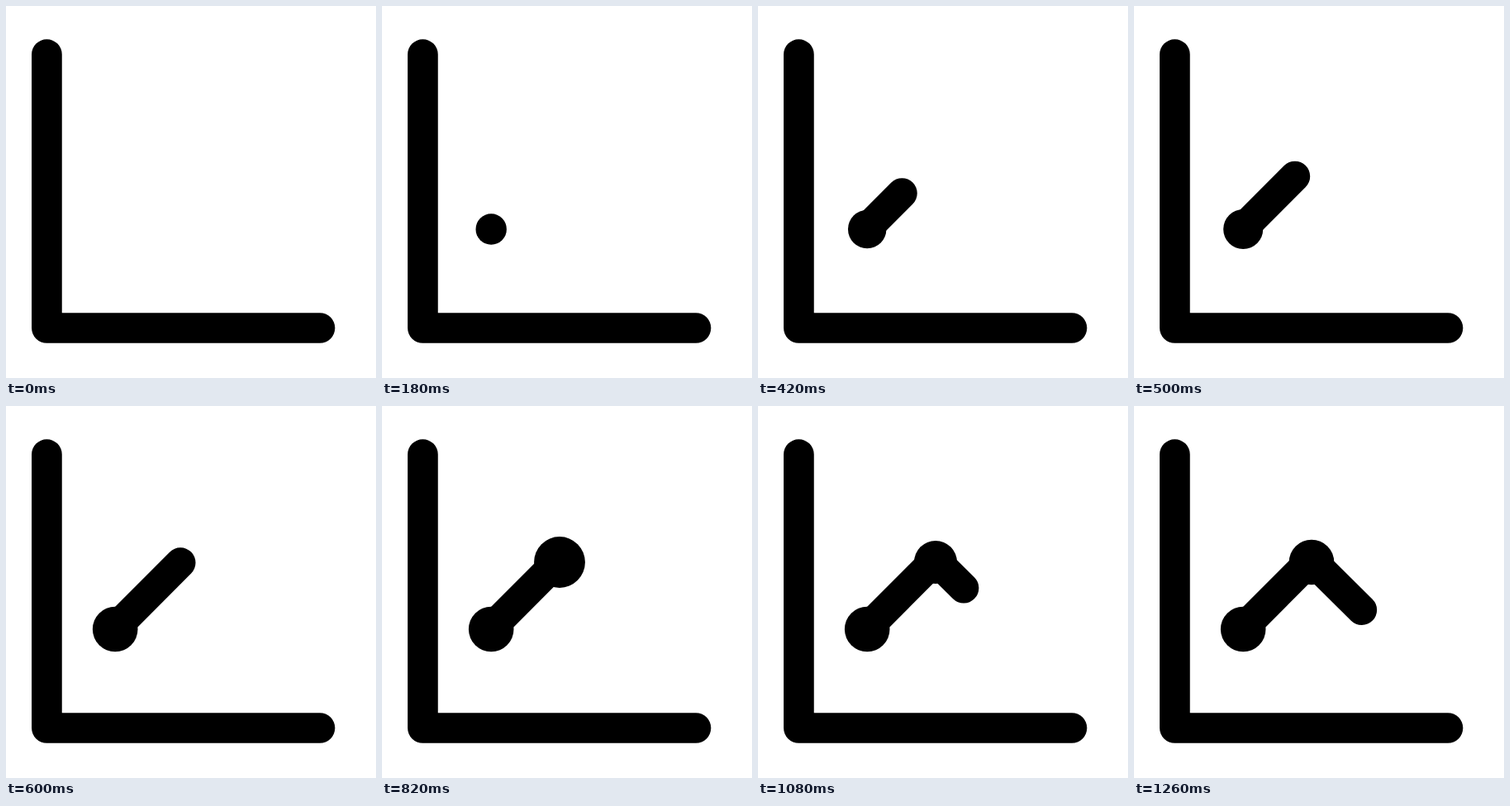
Recreate the animation shown at these times as an HTML page without scripts. Size 448 by 450 pixels, loop 1.32 s.

```html
<!DOCTYPE html>
<html lang="en">
<head>
<meta charset="utf-8">
<title>Line chart</title>
<style>
  html, body { margin: 0; width: 100%; height: 100%; overflow: hidden; background: #fff; }
  svg { display: block; width: 100%; height: 100%; }
  path { fill: none; stroke: #000; stroke-width: 36.7; stroke-linecap: round; stroke-linejoin: round; }

  .dot, .link { animation: 1320ms linear infinite; }
  .dot { r: 0; }
  .first { animation-name: pop-first; }
  .second { animation-name: pop-second; }

  /* An offset past 100 keeps the round cap hidden until the line starts. */
  .link { stroke-dasharray: 100 999; stroke-dashoffset: 101; }
  .rise { animation-name: draw-rise; }
  .fall { animation-name: draw-fall; }

  @keyframes pop-first {
    0% { r: 0; }
    22.73% { r: 31px; }
    33.33% { r: 22px; }
    47.73% { r: 28.3px; }
    56.06%, 100% { r: 27.3px; }
  }
  @keyframes pop-second {
    0%, 39.39% { r: 0; }
    62.12% { r: 31px; }
    72.73% { r: 22px; }
    87.12% { r: 28.3px; }
    95.45%, 100% { r: 27.3px; }
  }
  @keyframes draw-rise {
    0%, 18.94% { stroke-dashoffset: 101; }
    42.8%, 100% { stroke-dashoffset: 0; }
  }
  @keyframes draw-fall {
    0%, 66.29% { stroke-dashoffset: 101; }
    93.94%, 100% { stroke-dashoffset: 0; }
  }
</style>
</head>
<body>
<svg viewBox="0 0 448 450">
  <path d="M49.4 58.6V389.5H380"/>
  <path class="link rise" pathLength="100" d="M131.5 269.5L211.2 189.6"/>
  <path class="link fall" pathLength="100" d="M215 186.5L275.8 246.7"/>
  <circle class="dot first" cx="132.2" cy="270"/>
  <circle class="dot second" cx="215" cy="189"/>
</svg>
</body>
</html>
```
